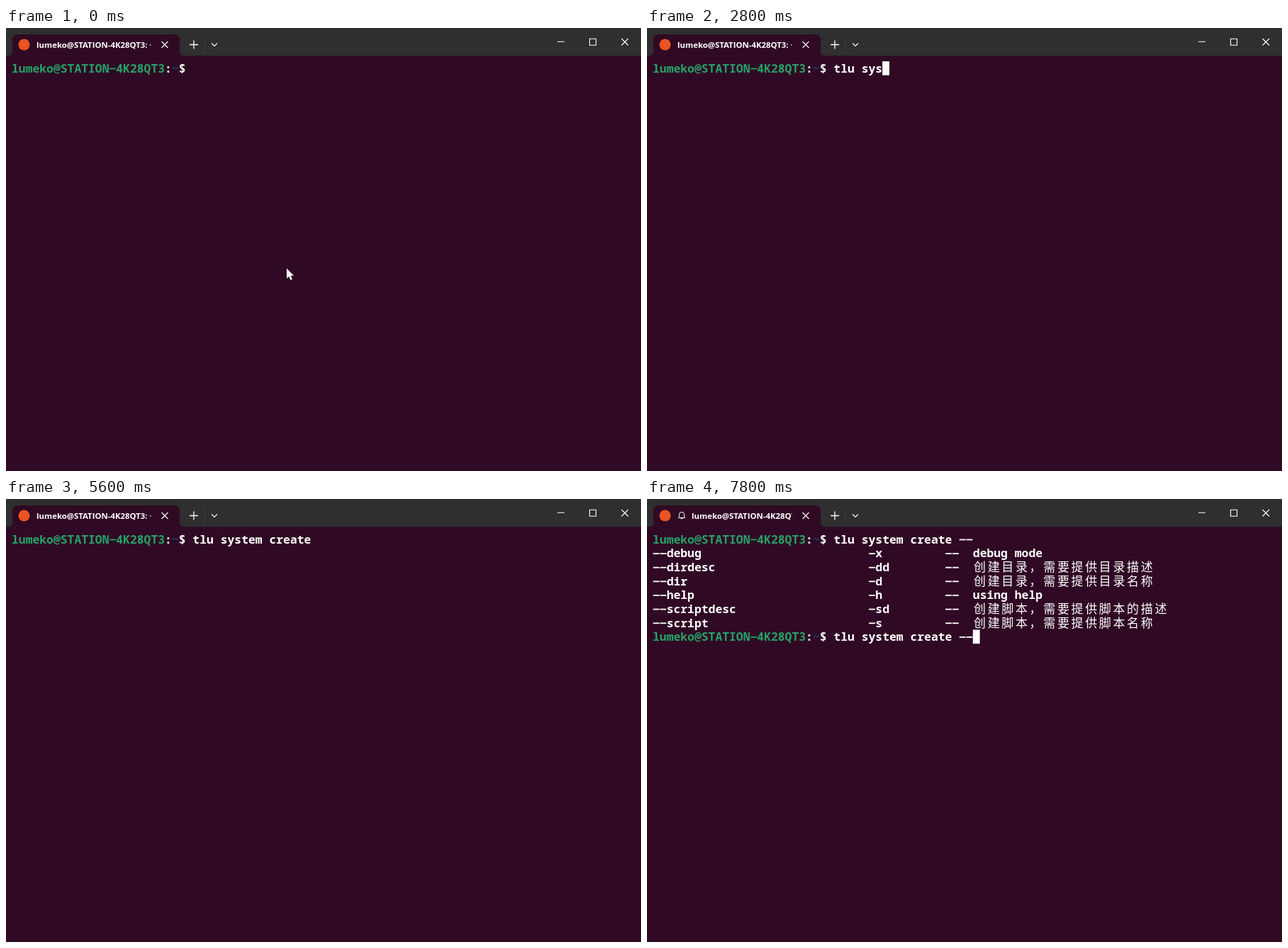
These frames come from a looping animation (896 px wide and 625 px high, 8 s). An HTML page with a canvas:

```html
<!DOCTYPE html>
<html lang="en">
<head>
<meta charset="utf-8">
<title>Terminal</title>
<style>
  html, body { margin: 0; height: 100%; overflow: hidden; background: #300a24; }
  canvas { display: block; width: 896px; height: 625px; }
</style>
</head>
<body>
<canvas id="stage" width="896" height="625"></canvas>
<script>
const ctx = document.getElementById("stage").getContext("2d");
const LOOP = 8000;
const CELL_W = 9.822, ROW_H = 19.64, LEFT = 8, TOP = 47;
const COLORS = { back: "#300a24", bar: "#2f2f2f", green: "#26a269", blue: "#12488b", white: "#ffffff", accent: "#e95420" };
const MONO = '600 16.37px "Noto Sans Mono", monospace';
const CJK = '17px "Noto Sans CJK SC", "Noto Sans CJK", sans-serif';
const TITLE = '700 11.4px "Open Sans", sans-serif';

const HOST = "lumeko@STATION-4K28QT3";
const COMMAND = "tlu system create --";
// [time, number of typed characters]
const TYPING = [[0, 0], [1870, 1], [2070, 2], [2200, 3], [2400, 4], [2600, 5], [2800, 7], [3070, 11],
  [4330, 12], [4670, 13], [4730, 14], [5000, 18], [6000, 19], [6200, 20]];
const CURSOR_OFF = [[0, 400], [1000, 1530], [3670, 4200], [5600, 6000], [6730, 7330]];
const POINTER = [[0, 396, 339], [200, 395, 334], [270, 394, 328], [330, 393, 322], [400, 392, 318]];
const POINTER_HIDE = 1800, BELL = 7600, OUTPUT = 7800;
const OPTIONS = [
  ["--debug", "-x", "debug mode"],
  ["--dirdesc", "-dd", "创建目录，需要提供目录描述"],
  ["--dir", "-d", "创建目录，需要提供目录名称"],
  ["--help", "-h", "using help"],
  ["--scriptdesc", "-sd", "创建脚本，需要提供脚本的描述"],
  ["--script", "-s", "创建脚本，需要提供脚本名称"],
];

const latest = (steps, t) => steps.findLast(step => step[0] <= t);

function stroke(path, color = "#fff", width = 1) {
  ctx.strokeStyle = color;
  ctx.lineWidth = width;
  ctx.stroke(new Path2D(path));
}

function fill(path, color) {
  ctx.fillStyle = color;
  ctx.fill(new Path2D(path));
}

// Puts text on the terminal grid; wide characters take two cells, hyphens nearly fill theirs.
function put(text, col, row, color = COLORS.white) {
  const baseline = TOP + row * ROW_H + 15.8;
  ctx.fillStyle = color;
  for (const char of text) {
    const wide = char > "\u2fff";
    const x = LEFT + col * CELL_W;
    ctx.font = wide ? CJK : MONO;
    if (char === "-") ctx.fillRect(x + 0.6, baseline - 6.3, CELL_W - 1, 1.8);
    else ctx.fillText(char, wide ? x + 1.2 : x, baseline);
    col += wide ? 2 : 1;
  }
  return col;
}

function prompt(row, typed) {
  let col = put(HOST, 0, row, COLORS.green);
  col = put(":", col, row);
  col = put("~", col, row, COLORS.blue);
  return put("$ " + typed, col, row);
}

function drawTitleBar(t) {
  ctx.fillStyle = COLORS.bar;
  ctx.fillRect(0, 0, 896, 39);
  fill("M3 39 Q9 39 9 33 V17 Q9 9 17 9 H237 Q245 9 245 17 V33 Q245 39 251 39 Z", COLORS.back);
  fill("M17.5 23.5 a8 8 0 1 1 16 0 a8 8 0 1 1 -16 0", COLORS.accent);

  const belled = t >= BELL;
  if (belled) stroke("M44.5 26.5 H53.5 L52.5 24.5 V22 A3.5 3.5 0 0 0 45.5 22 V24.5 Z M47.5 27 A1.6 1.6 0 0 0 50.5 27");
  ctx.save();
  ctx.beginPath();
  ctx.rect(43, 10, 161.5, 28);
  ctx.clip();
  ctx.font = TITLE;
  ctx.fillStyle = COLORS.white;
  ctx.fillText(HOST + ": ~", belled ? 63 : 43, 28);
  ctx.restore();

  stroke("M219.5 19 l9 9 m0 -9 l-9 9", "#fff", 1.1);
  stroke("M259 23.5 h12 M265 17.5 v12", "#fff", 1.3);
  stroke("M280.5 12 v24", "#3c3c3c");
  stroke("M290 21.5 l4 4 l4 -4", "#fff", 1.1);
  stroke("M778 19.2 h10 M823.5 15.2 h9 v9 h-9 z", "#fff", 1.1);
  stroke("M868.5 15 l9.5 9.5 m0 -9.5 l-9.5 9.5", "#fff", 1.1);
}

function drawPointer(t) {
  const [, x, y] = latest(POINTER, t);
  ctx.save();
  ctx.translate(x, y);
  const arrow = "M0 0 V14.5 L3.2 11.5 L5.4 16.5 L8 15.4 L5.8 10.5 H10.2 Z";
  stroke(arrow, "#16040f", 1.2);
  fill(arrow, COLORS.white);
  ctx.restore();
}

function draw(t) {
  ctx.fillStyle = COLORS.back;
  ctx.fillRect(0, 0, 896, 625);
  drawTitleBar(t);

  let row = 0;
  let col = prompt(row, COMMAND.slice(0, latest(TYPING, t)[1]));
  if (t >= OUTPUT) {
    for (const [name, short, description] of OPTIONS) {
      row++;
      put(name, 0, row);
      put(short, 31, row);
      put("--", 42, row);
      put(description, 46, row);
    }
    col = prompt(++row, COMMAND);
  }
  if (!CURSOR_OFF.some(([from, to]) => t >= from && t < to)) {
    ctx.fillStyle = COLORS.white;
    ctx.fillRect(LEFT + col * CELL_W, TOP + row * ROW_H, CELL_W, ROW_H);
  }
  if (t < POINTER_HIDE) drawPointer(t);
}

const start = performance.now();
function frame() {
  draw((performance.now() - start) % LOOP);
  requestAnimationFrame(frame);
}
frame();
</script>
</body>
</html>
```
